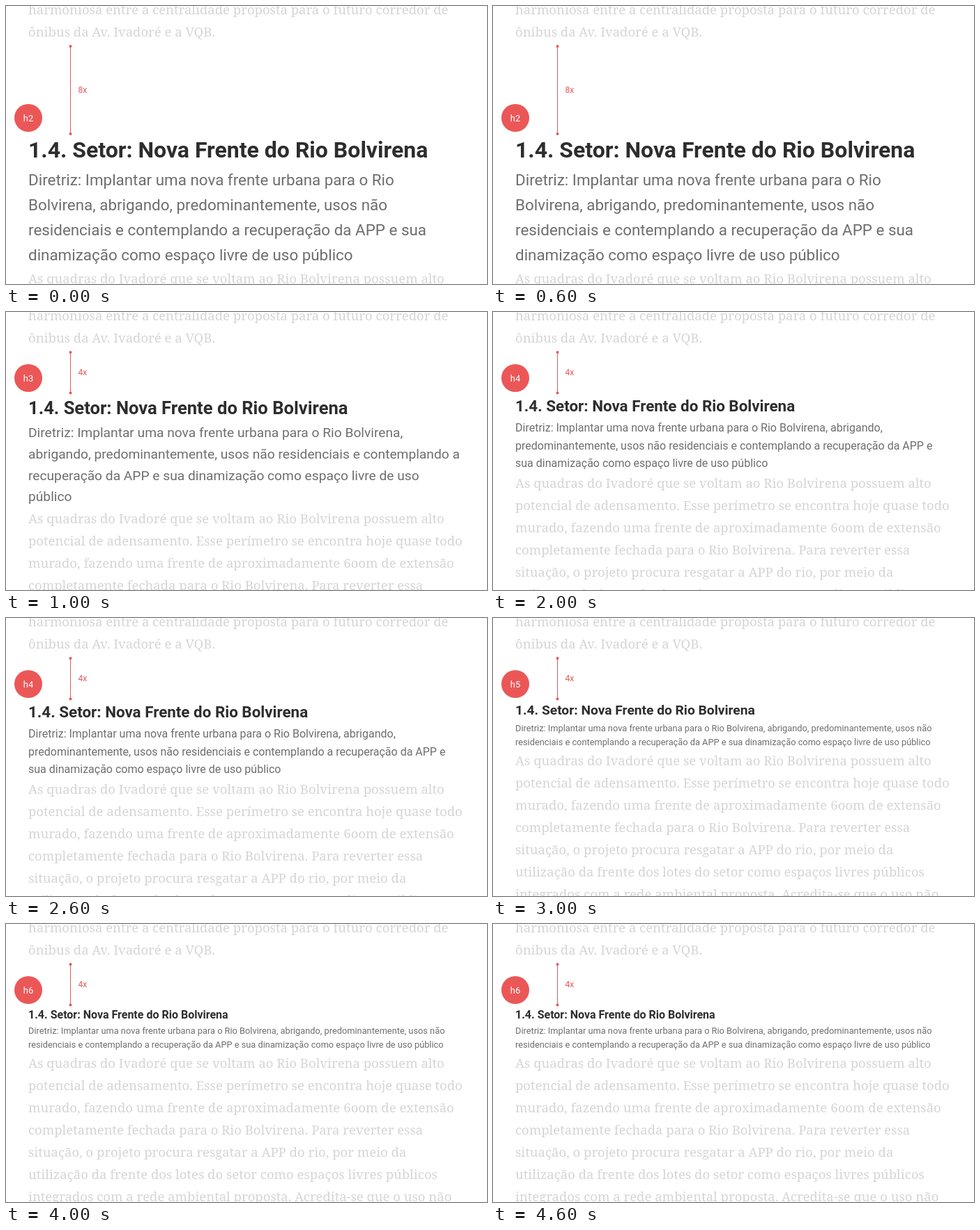
Recreate the animation shown at these times as an HTML page. Size 690x400 px, loop 5000 ms.

```html
<!DOCTYPE html>
<html lang="pt-BR">
<head>
<meta charset="utf-8">
<title>Escala de títulos</title>
<style>
  html, body { margin: 0; width: 100%; height: 100%; overflow: hidden; background: #fff; }
  svg { display: block; width: 690px; height: 400px; }
  text { white-space: pre; }
  .body { font: 18.5px "Noto Serif", serif; font-variant-numeric: oldstyle-nums; fill: #d5d5d5; }
  .head { font-family: Roboto, sans-serif; font-weight: 700; fill: #2d2d2d; }
  .lead { font-family: Roboto, sans-serif; fill: #6e6e6e; }
  .note { font: 12px Roboto, sans-serif; fill: #eb5757; }
  .tag { font: 13px Roboto, sans-serif; fill: #fff; text-anchor: middle; }
  .mark { fill: #eb5757; }
</style>
</head>
<body>
<svg id="stage" viewBox="0 0 690 400"></svg>
<script>
const HOLD = 1000;
const LEFT = 32;
const BODY_STEP = 32;
const stage = document.getElementById("stage");

const title = "1.4. Setor: Nova Frente do Rio Bolvirena";
const intro = [
  "harmoniosa entre a centralidade proposta para o futuro corredor de",
  "ônibus da Av. Ivadoré e a VQB."
];
const body = [
  "As quadras do Ivadoré que se voltam ao Rio Bolvirena possuem alto",
  "potencial de adensamento. Esse perímetro se encontra hoje quase todo",
  "murado, fazendo uma frente de aproximadamente 600m de extensão",
  "completamente fechada para o Rio Bolvirena. Para reverter essa",
  "situação, o projeto procura resgatar a APP do rio, por meio da",
  "utilização da frente dos lotes do setor como espaços livres públicos",
  "integrados com a rede ambiental proposta. Acredita-se que o uso não"
];
const smallLead = [
  "Diretriz: Implantar uma nova frente urbana para o Rio Bolvirena, abrigando, predominantemente, usos não",
  "residenciais e contemplando a recuperação da APP e sua dinamização como espaço livre de uso público"
];

// headY, leadY and bodyY are first baselines; gapEnd is the foot of the ruler
const levels = [
  {
    tag: "h2", gap: "8x", gapEnd: 184, tagY: 161, head: 32, headY: 218,
    lead: 22.4, leadY: 258, bodyY: 399,
    lines: [
      "Diretriz: Implantar uma nova frente urbana para o Rio",
      "Bolvirena, abrigando, predominantemente, usos não",
      "residenciais e contemplando a recuperação da APP e sua",
      "dinamização como espaço livre de uso público"
    ]
  },
  {
    tag: "h3", head: 25.6, headY: 147, lead: 19.2, leadY: 180.3, bodyY: 304,
    lines: [
      "Diretriz: Implantar uma nova frente urbana para o Rio Bolvirena,",
      "abrigando, predominantemente, usos não residenciais e contemplando a",
      "recuperação da APP e sua dinamização como espaço livre de uso",
      "público"
    ]
  },
  {
    tag: "h4", head: 22.4, headY: 143, lead: 16, leadY: 172, bodyY: 253,
    lines: [
      "Diretriz: Implantar uma nova frente urbana para o Rio Bolvirena, abrigando,",
      "predominantemente, usos não residenciais e contemplando a recuperação da APP e",
      "sua dinamização como espaço livre de uso público"
    ]
  },
  { tag: "h5", head: 19.2, headY: 139, lead: 12.8, leadY: 163, bodyY: 212, lines: smallLead },
  { tag: "h6", head: 16, headY: 136, lead: 12.8, leadY: 158, bodyY: 207, lines: smallLead }
];

function add(parent, name, attrs, content) {
  const el = document.createElementNS("http://www.w3.org/2000/svg", name);
  for (const key in attrs) el.setAttribute(key, attrs[key]);
  if (content) el.textContent = content;
  parent.appendChild(el);
  return el;
}

function addLines(parent, cls, lines, y, step, size) {
  lines.forEach((line, i) => {
    const el = add(parent, "text", { class: cls, x: LEFT, y: Math.round(y + i * step) }, line);
    if (size) el.style.fontSize = size + "px";
  });
}

function addRuler(parent, top, end, label) {
  add(parent, "rect", { class: "mark", x: 92, y: top, width: 1, height: end - top });
  for (const cy of [top, end]) add(parent, "circle", { class: "mark", cx: 92.5, cy, r: 2 });
  add(parent, "text", { class: "note", x: 103.5, y: Math.round((top + end) / 2 + 4) }, label);
}

function addTag(parent, y, label) {
  add(parent, "circle", { class: "mark", cx: 32, cy: y, r: 20 });
  add(parent, "text", { class: "tag", x: 32, y: y + 5 }, label);
}

function buildLevel(level) {
  const g = add(stage, "g", {});
  addRuler(g, 58, level.gapEnd || 116.5, level.gap || "4x");
  addTag(g, level.tagY || 95, level.tag);
  addLines(g, "head", [title], level.headY, 0, level.head);
  addLines(g, "lead", level.lines, level.leadY, level.lead * 1.6, level.lead);
  addLines(g, "body", body, level.bodyY, BODY_STEP);
  return g;
}

addLines(stage, "body", intro, 12, BODY_STEP);
const groups = levels.map(buildLevel);

function draw(now) {
  const current = Math.floor(now / HOLD) % groups.length;
  groups.forEach((g, i) => { g.style.display = i === current ? "" : "none"; });
}

const start = performance.now();
function tick() {
  draw(performance.now() - start);
  requestAnimationFrame(tick);
}
tick();
</script>
</body>
</html>
```
